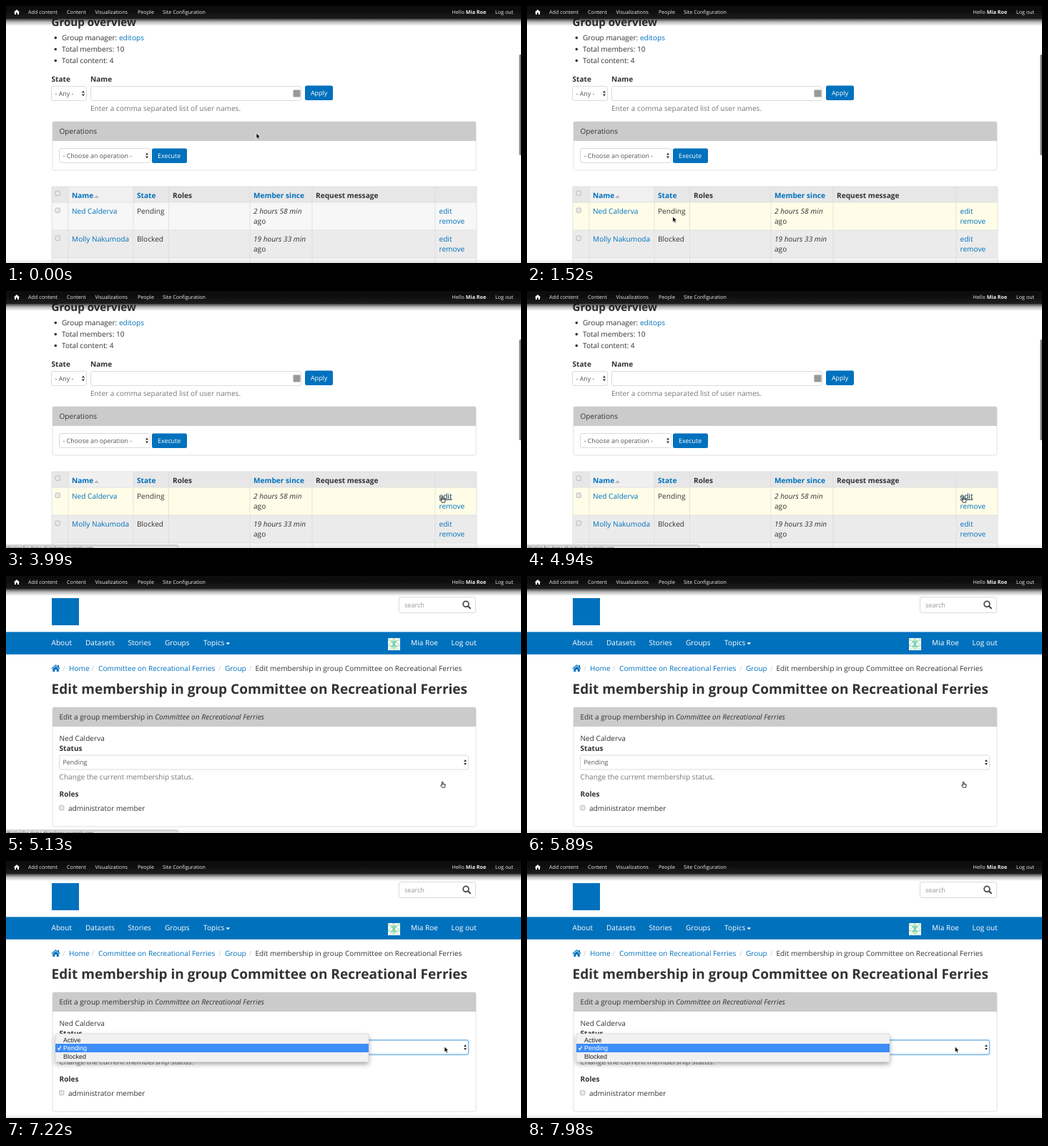
Recreate the animation shown at these times as an HTML page. Size 720 by 360 pixels, loop 8000 ms.

```html
<!DOCTYPE html>
<html lang="en">
<head>
<meta charset="utf-8">
<title>Group membership</title>
<style>
  html, body { margin: 0; width: 100%; height: 100%; overflow: hidden; background: #fff; }
  svg { display: block; width: 720px; height: 360px; }
  text { font-family: "Open Sans", "Noto Sans", sans-serif; text-rendering: geometricPrecision; white-space: pre; }
  .b { font-weight: 700; }
  .i { font-style: italic; }
  .menu { font-family: "Liberation Sans", Arial, sans-serif; }
</style>
</head>
<body>
<svg id="stage" viewBox="0 0 720 360" xmlns="http://www.w3.org/2000/svg">
  <defs>
    <linearGradient id="bar" x1="0" y1="0" x2="0" y2="1">
      <stop offset=".4" stop-color="#0d0d0d"/>
      <stop offset="1" stop-color="#1e1e1e"/>
    </linearGradient>
    <linearGradient id="fade" x1="0" y1="0" x2="0" y2="1">
      <stop offset="0" stop-color="#000" stop-opacity=".74"/>
      <stop offset=".45" stop-color="#000" stop-opacity=".27"/>
      <stop offset="1" stop-color="#000" stop-opacity="0"/>
    </linearGradient>
    <linearGradient id="foot" x1="0" y1="0" x2="0" y2="1">
      <stop offset="0" stop-color="#000" stop-opacity="0"/>
      <stop offset="1" stop-color="#000" stop-opacity=".09"/>
    </linearGradient>
    <filter id="drop" x="-5%" y="-30%" width="110%" height="180%">
      <feDropShadow dx="0" dy="3" stdDeviation="3.2" flood-opacity=".35"/>
    </filter>
  </defs>
  <g id="list"></g>
  <g id="form"></g>
  <g id="top"></g>
  <g id="status"></g>
  <g id="arrow"><path d="M0 0V7.8L1.8 6.2L3 8.9L4.5 8.3L3.3 5.6H5.7Z" fill="#000" stroke="#fff" stroke-width=".7"/></g>
  <g id="hand"><path d="M-.8 .6Q0 -.5 .7 .6V3.1L3.2 3.6Q4 3.8 3.9 4.9L3.2 8.2H-.8L-2.7 5.2Q-2.6 4.1 -.8 5.1Z" fill="#fff" stroke="#000" stroke-width=".8" stroke-linejoin="round"/><path d="M.7 3.1V4.6M1.8 3.4V4.7M2.8 3.6V4.8" stroke="#000" stroke-width=".5"/></g>
</svg>
<script>
const LOOP = 8000, STEP = 190;
const INK = '#333', LINK = '#0071bd', GREY = '#777', BASE = 10.12, SMALL = 8.9;
const MEMBER = 'Ned Calderva', COMMITTEE = 'Committee on Recreational Ferries', USER = 'Mia Roe';

const $ = id => document.getElementById(id);
const text = (x, y, s, fill = INK, cls = '', size = BASE, extra = '') =>
  `<text x="${x}" y="${y}" fill="${fill}" class="${cls}" font-size="${size}" ${extra}>${s}</text>`;
const rect = (x, y, w, h, fill, stroke = 'none', r = 0, extra = '') =>
  `<rect x="${x}" y="${y}" width="${w}" height="${h}" fill="${fill}" stroke="${stroke}" rx="${r}" ${extra}/>`;
const path = (d, fill, extra = '') => `<path d="${d}" fill="${fill}" ${extra}/>`;
const check = (x, y) => rect(x + .5, y + .5, 6.4, 6.4, '#e9e9e9', '#adadad', 1.5, 'stroke-width=".8"');
const field = (x, y, w, h) => rect(x + .5, y + .5, w - 1, h - 1, '#fff', '#d2d2d2', 2.5, 'stroke-width=".8"');
const arrows = (x, y) => path(`M${x - 2} ${y - 1}h4l-2 -3zM${x - 2} ${y + 1}h4l-2 3z`, '#333');
const select = (x, y, w, h, label) =>
  field(x, y, w, h) + text(x + 5.5, y + h / 2 + 3.2, label, '#555', '', SMALL) + arrows(x + w - 5, y + h / 2);
const button = (x, y, w, label) =>
  rect(x, y, w, 20.5, LINK, 'none', 2.5) + text(x + 8, y + 13.5, label, '#fff', '', SMALL);
const panel = (y, h, title) =>
  rect(65, y, 592, h, '#fff', '#ddd', 2.5, 'stroke-width=".9"') +
  path(`M65 ${y + 27}V${y + 2}q0 -2 2 -2H655q2 0 2 2V${y + 27}z`, '#cbcbcb') + text(74.5, y + 17.2, title);

function memberRow(y, id, fill, name, state, since) {
  return rect(64, y, 594, 39, fill, 'none', 0, `id="${id}"`) +
    check(68.5, y + 7.5) +
    text(92, y + 15.7, name, LINK) + text(183, y + 15.7, state) +
    text(346, y + 15.7, since, INK, 'i') + text(346, y + 29.7, 'ago') +
    text(605.5, y + 15.7, 'edit', LINK, '', BASE, `id="${id}Edit"`) + text(605.5, y + 29.7, 'remove', LINK);
}

function listPage() {
  const bullets = ['Group manager: <tspan fill="' + LINK + '">editops</tspan>', 'Total members: 10', 'Total content: 4'];
  const heads = [[92, 'Name', LINK], [183, 'State', LINK], [233, 'Roles', INK], [346, 'Member since', LINK], [433, 'Request message', INK]];
  let out = rect(0, 0, 720, 360, '#fff') + text(63.5, 27.6, 'Group overview', INK, 'b', 15.1);
  bullets.forEach((s, i) => {
    out += `<circle cx="69.3" cy="${44.6 + 16 * i}" r="1.8" fill="${INK}"/>` + text(78, 47.6 + 16 * i, s);
  });
  out += text(63.5, 105.7, 'State', INK, 'b') + text(118, 105.7, 'Name', INK, 'b') +
    select(63, 112, 50, 21, '- Any -') + field(118, 112, 295, 21) + rect(401.5, 117.5, 10, 10, '#999', 'none', 1) +
    button(418, 111.5, 39, 'Apply') + text(118, 146.6, 'Enter a comma separated list of user names.', GREY);
  out += panel(162, 68, 'Operations') + select(74, 199, 128, 21, '- Choose an operation -') + button(204, 199.5, 49, 'Execute');
  out += rect(64, 253, 594, 22, '#e7e7e7') + rect(87, 253, 91, 22, '#f0f0f0') + check(68.5, 258.5);
  heads.forEach(([x, s, c]) => out += text(x, 268.8, s, c, 'b'));
  out += path('M123 269h7l-3.5 -4z', '#bbb');
  out += memberRow(275, 'row', '#f7f7f7', MEMBER, 'Pending', '2 hours 58 min') +
    memberRow(314, 'next', '#ebebeb', 'Molly Nakumoda', 'Blocked', '19 hours 33 min') +
    rect(64, 353, 594, 7, '#f7f7f7');
  const lines = [64, 87, 178, 227.5, 341, 428, 600, 658].map(x => `M${x} 253V360`).join('') +
    [253, 275, 314, 353].map(y => `M64 ${y}H658`).join('');
  out += path(lines, 'none', 'stroke="#dcdcdc" stroke-width=".8"');
  return out + rect(717.5, 68, 4, 141, '#7d7d7d', 'none', 1.5);
}

// Mirrored dot pattern of the profile picture
function avatar(x, y) {
  let out = rect(x, y, 17, 17, '#fff');
  for (let r = 0; r < 8; r++)
    for (let c = 0; c < 4; c++)
      if ((r * 5 + c * 3 + r * c) % 4 < 2)
        for (const k of [c, 7 - c]) out += rect(x + .5 + k * 2, y + .5 + r * 2, 1.7, 1.7, r > 1 && r < 6 && c > 1 ? '#3fbf8f' : '#a9dcae');
  return out;
}

function formPage() {
  const nav = [[63.5, 'About'], [111, 'Datasets'], [170.5, 'Stories'], [222, 'Groups'], [276, 'Topics'], [566, USER], [622.5, 'Log out']];
  const crumbs = [[88, 'Home', LINK], [129, COMMITTEE, LINK], [306, 'Group', LINK], [348.5, 'Edit membership in group ' + COMMITTEE, INK]];
  let out = rect(0, 0, 720, 360, '#fff') + rect(64, 31, 38, 38, LINK) +
    field(549, 29, 108, 23) + text(557, 43.9, 'search', '#999', '', 9.1) +
    '<circle cx="643" cy="39.3" r="3.9" fill="none" stroke="#444" stroke-width="1.7"/>' +
    path('M646 42.3L649 45.3', 'none', 'stroke="#444" stroke-width="2" stroke-linecap="round"') +
    rect(0, 78.4, 720, 31.4, LINK);
  nav.forEach(([x, s]) => out += text(x, 97.3, s, '#fff'));
  out += path('M307.5 93.2h5.6l-2.8 3z', '#fff') + avatar(534, 87);
  out += path('M63.5 129.3L69.5 124L72.3 126.4V124.7H74V128L75.6 129.3L74.8 130.2L69.5 125.6L64.3 130.2ZM65.3 130.2L69.5 126.6L73.8 130.2V134H70.8V131H68.3V134H65.3Z', LINK);
  [79, 119.5, 297, 340].forEach(x => out += text(x, 133.3, '/', '#ccc'));
  crumbs.forEach(([x, s, c]) => out += text(x, 133.3, s, c));
  out += text(63.5, 164.6, 'Edit membership in group ' + COMMITTEE, INK, 'b', 19.04);
  out += panel(184, 167, `Edit a group membership in <tspan class="i">${COMMITTEE}</tspan>`) +
    text(74.5, 230.7, MEMBER) + text(74.5, 244.6, 'Status', INK, 'b') +
    select(74, 250.5, 573, 21, 'Pending') +
    text(74.5, 285.4, 'Change the current membership status.', GREY) +
    text(74.5, 308.5, 'Roles', INK, 'b') + check(74, 321) + text(87, 329, 'administrator member');
  out += '<g id="menu">' +
    rect(74, 250.5, 573, 21, 'none', '#66afe9', 3, 'stroke-width="3" opacity=".22"') +
    rect(74.5, 251, 572, 20, 'none', '#66afe9', 2.5, 'stroke-width=".9"') +
    rect(69, 242, 438, 39.5, '#f1f1f1', '#c4c4c4', 2, 'stroke-width=".5" filter="url(#drop)"') +
    rect(69, 256, 438, 12, '#3d8dfb');
  [['Active', 253.6, '#222'], ['Pending', 265.2, '#fff'], ['Blocked', 276.8, '#222']]
    .forEach(([s, y, c]) => out += text(80, y, s, c, 'menu', 9));
  return out + path('M72.3 262.2L74 264.4L76.8 259.4', 'none', 'stroke="#fff" stroke-width="1.2"') + '</g>';
}

function toolbar() {
  const items = [[31, 'Add content'], [85, 'Content'], [124.5, 'Visualizations'], [184, 'People'], [219, 'Site Configuration'],
    [623.5, `Hello <tspan class="b">${USER}</tspan>`], [684, 'Log out']];
  return rect(0, 354, 720, 6, 'url(#foot)') + rect(0, 18, 720, 10, 'url(#fade)') + rect(0, 0, 720, 18, 'url(#bar)') +
    path('M10.8 8.7L15 4.9L19.2 8.7H18V12H16V9.6H14V12H12V8.7Z', '#fff') +
    items.map(([x, s]) => text(x, 11.2, s, '#eee', '', 7.2)).join('');
}

$('list').innerHTML = listPage();
$('form').innerHTML = formPage();
$('top').innerHTML = toolbar();
$('status').innerHTML = rect(-3, 356, 243.5, 9, '#dedede', '#aaa', 2, 'stroke-width=".8"') +
  text(1, 362.2, 'Waiting for demo.dkandemo.example.com...', '#333', '', 6.1);

// time, x, y of the pointer
const TRACK = [
  [0, 350, 178], [1140, 405, 286], [1520, 203.8, 295], [2660, 203.8, 295], [3230, 467.5, 292],
  [3800, 610.3, 288], [6080, 610.3, 288], [6840, 613, 260], [7220, 613, 260], [7980, 598.4, 260]
];

function pointer(t) {
  const n = Math.max(1, TRACK.findIndex(k => k[0] >= t));
  const [t0, x0, y0] = TRACK[n - 1], [t1, x1, y1] = TRACK[n];
  const p = (t - t0) / (t1 - t0);
  return [x0 + (x1 - x0) * p, y0 + (y1 - y0) * p];
}

const show = (id, on) => $(id).setAttribute('display', on ? 'inline' : 'none');

function draw(ms) {
  const t = Math.floor(ms / STEP) * STEP;
  const [x, y] = pointer(t);
  const onForm = t >= 5130, onLink = t >= 3800 && t < 6270;
  show('list', !onForm);
  show('form', onForm);
  show('status', t >= 3990 && t < 5700);
  show('menu', t >= 7030);
  show('arrow', !onLink);
  show('hand', onLink);
  for (const id of ['arrow', 'hand']) $(id).setAttribute('transform', `translate(${x} ${y})`);
  $('row').setAttribute('fill', y > 275 ? '#fffde8' : '#f7f7f7');
  $('rowEdit').setAttribute('fill', onLink ? '#00294a' : LINK);
  $('rowEdit').setAttribute('text-decoration', onLink ? 'underline' : 'none');
}

const start = performance.now();
function tick() {
  draw((performance.now() - start) % LOOP);
  requestAnimationFrame(tick);
}
tick();
</script>
</body>
</html>
```
